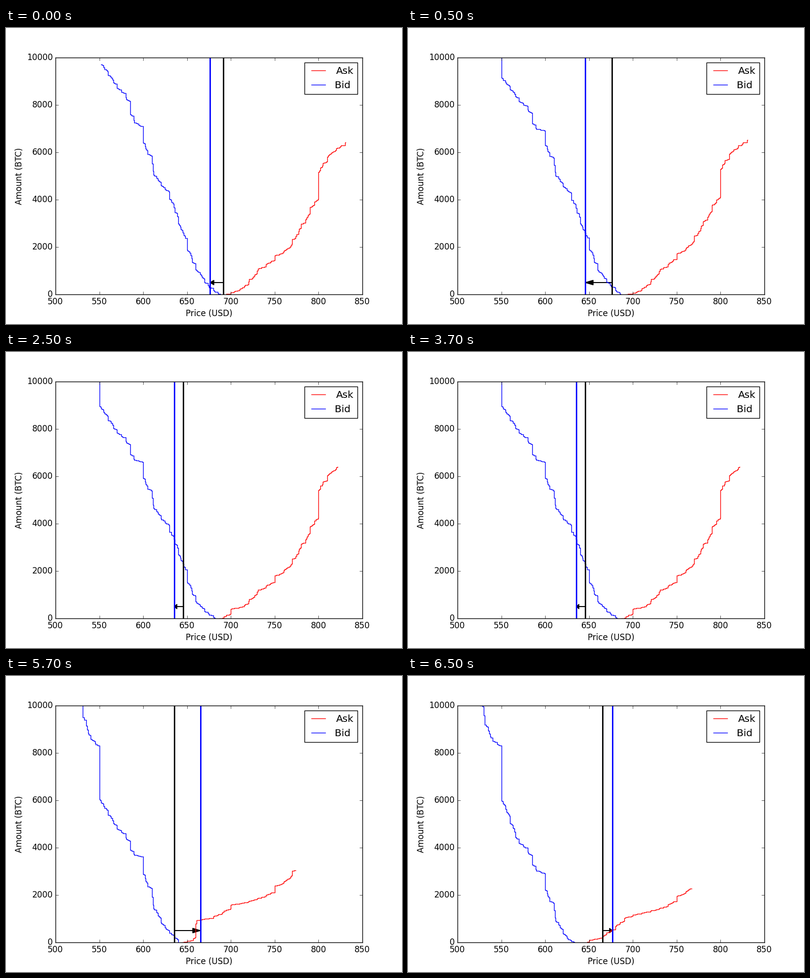
A matplotlib script for the animation above (8000 ms loop, 800 px wide and 600 px high).

```python
import numpy as np
import matplotlib.pyplot as plt
from matplotlib.animation import FuncAnimation

plt.style.use("classic")

INTERVAL = 500
FRAMES = 16

# Prices, outward from the spread, at which the depth is pinned.
BID_KEYS = (675, 664, 652, 642, 628, 613, 602, 598, 589, 584, 568, 552, 548,
            537, 526)
ASK_KEYS = (657, 662, 677, 692, 702, 713, 732, 748, 752, 767, 774, 783, 798,
            802, 813, 822, 831)

rng = np.random.default_rng(4)
noise = rng.exponential(1, 400)


def order_size(price):
    """Relative size of the orders at a price; round prices attract more."""
    for step, size in ((50, 15), (10, 6), (5, 3)):
        if price % step == 0:
            return size
    return noise[price - 500]


def depth_curve(keys, best, *depths):
    """Staircase from the best price through depths (in tens) at the keys."""
    way = 1 if keys[-1] > keys[0] else -1
    levels = [key for key in keys if (key - best) * way > 0]
    xs, ys = [best], [0]
    for start, end, depth in zip([best] + levels, levels, depths):
        prices = np.arange(start, end, way)
        total = np.cumsum([order_size(p) for p in prices])
        base = ys[-1]
        after = base + (10 * depth - base) * total / total[-1]
        before = np.append(base, after[:-1])
        xs.extend(np.repeat(prices, 2))
        ys.extend(np.column_stack([before, after]).ravel())
        xs.append(end)
        ys.append(after[-1])
    return xs, ys


BIDS = (
    depth_curve(BID_KEYS, 688, 30, 93, 181, 285, 437, 500, 625, 711, 735, 816,
                890, 970),
    depth_curve(BID_KEYS, 687, 33, 90, 184, 285, 432, 497, 615, 693, 702, 766,
                832, 905, 1100),
    depth_curve(BID_KEYS, 683, 15, 59, 146, 257, 397, 460, 577, 662, 673, 735,
                799, 885, 1100),
    depth_curve(BID_KEYS, 640, 52, 138, 271, 363, 373, 429, 497, 590, 832,
                883, 1060),
    depth_curve(BID_KEYS, 634, 10, 85, 206, 293, 309, 368, 437, 585, 832, 870,
                1000),
)
ASKS = (
    depth_curve(ASK_KEYS, 695, 9, 26, 108, 142, 166, 196, 237, 301, 396, 522,
                591, 618, 641),
    depth_curve(ASK_KEYS, 692, 6, 28, 106, 147, 175, 210, 251, 313, 405, 534,
                602, 629, 653),
    depth_curve(ASK_KEYS, 687, 2, 42, 48, 120, 151, 182, 217, 255, 318, 418,
                546, 612, 639),
    depth_curve(ASK_KEYS, 644, 9, 94, 102, 128, 160, 166, 187, 210, 240, 269,
                305),
    depth_curve(ASK_KEYS, 648, 15, 17, 53, 105, 117, 126, 145, 172, 198, 227),
)
# Each snapshot moves from one trade price to the next.
TRADES = (691.4, 676.1, 645.6, 635.5, 665.4, 676.7)

fig = plt.figure(figsize=(8, 6), dpi=100, facecolor="white")
ax = fig.add_axes([0.125, 0.1, 0.775, 0.8])
ask_line, = ax.plot([], [], "r", label="Ask")
bid_line, = ax.plot([], [], "b", label="Bid")
old_price = ax.axvline(TRADES[0], color="k", lw=2)
new_price = ax.axvline(TRADES[1], color="b", lw=2)
arrow = ax.arrow(TRADES[0], 500, TRADES[1] - TRADES[0], 0, color="k",
                 width=0.001, head_width=200, head_length=4,
                 length_includes_head=True)
ax.set(xlim=(500, 850), ylim=(0, 10000))
ax.set_xlabel("Price (USD)")
ax.set_ylabel("Amount (BTC)", labelpad=4.2)
legend = ax.legend(loc="upper right", handletextpad=0.75)
legend.get_texts()[1].set_x(-2)


def update(frame):
    step = (frame + 3) // 4
    start, end = TRADES[step:step + 2]
    ask_line.set_data(*ASKS[step])
    bid_line.set_data(*BIDS[step])
    old_price.set_xdata([start, start])
    new_price.set_xdata([end, end])
    arrow.set_data(x=start, dx=end - start,
                   head_length=0.3 * abs(end - start))
    return ask_line, bid_line, old_price, new_price, arrow


anim = FuncAnimation(fig, update, frames=FRAMES, interval=INTERVAL,
                     repeat=True, repeat_delay=0)
plt.show()
```
